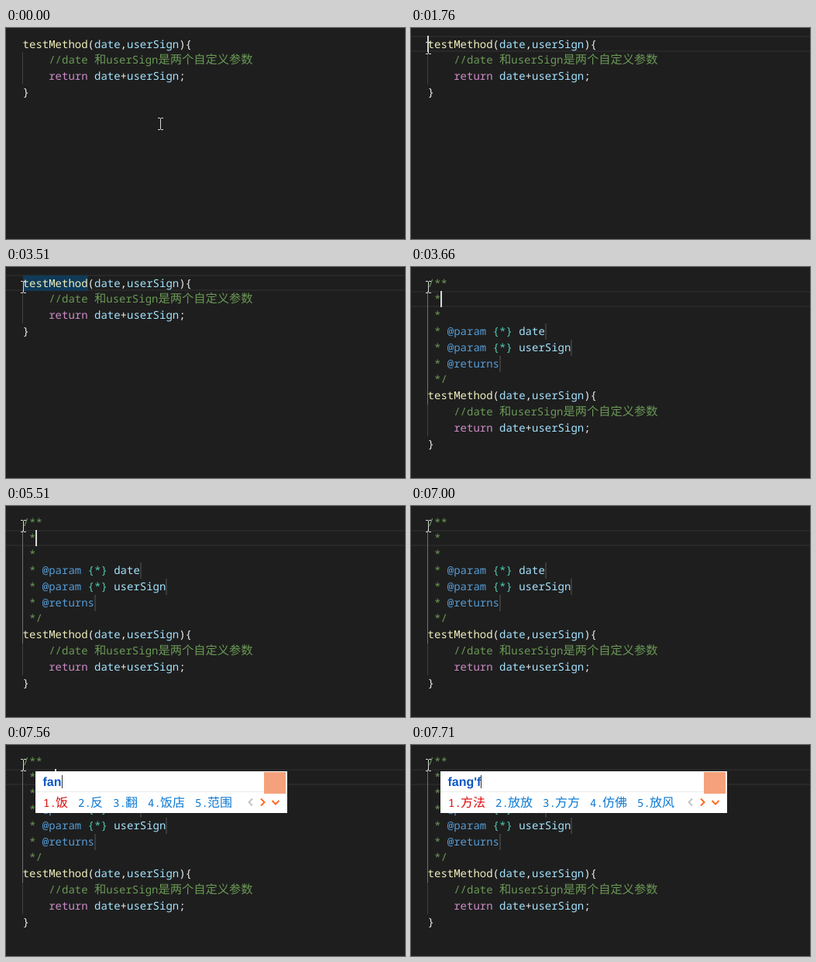
An HTML page with a canvas for the animation above (7.99 s loop, 515x273 px).

```html
<!DOCTYPE html>
<html lang="zh">
<head>
<meta charset="utf-8">
<title>Doc comment snippet</title>
<style>
html, body { margin: 0; width: 515px; height: 273px; overflow: hidden; background: #1e1e1e; }
canvas { display: block; }
</style>
</head>
<body>
<canvas id="stage" width="515" height="273"></canvas>
<script>
const ctx = document.getElementById('stage').getContext('2d');
ctx.textRendering = 'geometricPrecision';

const LOOP = 7990, LEFT = 21.6, CHAR = 8.4, ROW = 20.9;
const MONO = '500 14px "Noto Sans Mono", monospace';
const cjk = size => `${size}px "Noto Sans CJK SC", "Noto Sans CJK", sans-serif`;
const C = {
  fn: '#f0efbc', plain: '#ececec', param: '#a4e4ff', comment: '#6a9955',
  key: '#cd8cc8', tag: '#569cd6', type: '#4ec9b0', link: '#4e94ce'
};

// Each line is a list of [colour, text] runs.
const method = [
  [['fn', 'testMethod'], ['plain', '('], ['param', 'date'], ['plain', ','], ['param', 'userSign'], ['plain', '){']],
  [['comment', '    //date 和userSign是两个自定义参数']],
  [['key', '    return '], ['param', 'date'], ['plain', '+'], ['param', 'userSign'], ['plain', ';']],
  [['plain', '}']]
];
const star = (...runs) => [['comment', ' * '], ...runs];
const paramDoc = name => star(['tag', '@param '], ['type', '{*} '], ['param', name]);
const doc = [
  [['comment', '/**']], star(), star(), paramDoc('date'), paramDoc('userSign'),
  star(['tag', '@returns']), [['comment', ' */']]
];

// Mouse positions: [time, x, y]
const mouse = [
  [0, 199.5, 124], [440, 174, 103], [580, 69.5, 42], [730, 34, 20], [850, 27.5, 12],
  [1000, 24, 18], [1120, 19, 24], [1240, 19, 28], [1360, 21, 28], [1490, 22, 26]
];
const caretToggles = [1760, 2150, 2710, 3240, 3660, 4060, 4490, 5050, 5510, 6070, 6540, 7000];

// Input method states: [time, pinyin, candidates, right edge, editor caret column]
const input = [
  [7280, 'f', '发 放 分 非 ′', 328, 3],
  [7410, 'fa', '发 法 罚 发现 发展', 363, 0],
  [7560, 'fan', '饭 反 翻 饭店 范围', 363, 5],
  [7710, "fang'f", '方法 放放 方方 仿佛 放风', 408, 0]
];

const latest = (list, t) => list.filter(s => s[0] <= t).pop();
const rowTop = i => Math.round(10.4 + ROW * i);
const baseline = i => Math.round(25.5 + 20.8 * i);

function rect(color, x, y, w, h) {
  ctx.fillStyle = color;
  ctx.fillRect(x, y, w, h);
}

function text(s, x, y, color, font) {
  ctx.font = font;
  ctx.fillStyle = color;
  ctx.fillText(s, x, y);
  return x + ctx.measureText(s).width;
}

function stroke(color, width, ...points) {
  ctx.strokeStyle = color;
  ctx.lineWidth = width;
  ctx.beginPath();
  points.forEach(([x, y]) => ctx.lineTo(x, y));
  ctx.stroke();
}

function codeLine(runs, row) {
  let x = LEFT;
  for (const [color, s] of runs)
    for (const part of s.match(/[\u4e00-\u9fff]+|[^\u4e00-\u9fff]+/g))
      x = text(part, x, baseline(row), C[color], part > '\u4e00' ? cjk(15.25) : MONO);
}

function guide(from, to, color) {
  rect(color, 21, rowTop(from), 1, rowTop(to) - rowTop(from));
}

function currentLine(row) {
  rect('#282828', 0, rowTop(row), 515, 21);
  rect('#1e1e1e', 0, rowTop(row) + 2, 515, 17);
}

function caret(x, row) {
  rect('#d8d8d8', x, rowTop(row), 2, 21);
}

function beam(x, y) {
  x = Math.floor(x);
  rect('#d8d8d8', x, y - 7, 1, 14);
  for (const edge of [y - 8, y + 7]) {
    rect('#d8d8d8', x - 3, edge, 3, 1);
    rect('#d8d8d8', x + 1, edge, 3, 1);
  }
}

function hand() {
  const p = new Path2D('M21 38V28q0-2 1.5-2t1.5 2v6q3-1 3 1q3-1 3 1q3-1 3 2v4q0 3-2 5h-8l-6-8q-1-3 2-2z');
  ctx.fillStyle = '#fff';
  ctx.fill(p);
  ctx.strokeStyle = '#000';
  ctx.lineWidth = 1;
  ctx.stroke(p);
}

function chevron(x, y, dx, dy, color) {
  // dx, dy give the pointing direction
  const tip = [x + dx * 2.5, y + dy * 2.5];
  const end = k => [x - dx * 2 + dy * 4.5 * k, y - dy * 2 + dx * 4.5 * k];
  stroke(color, 2, end(-1), tip, end(1));
}

function inputPanel([, pinyin, words, right]) {
  rect('#fff', 38, 34, right - 38, 54);
  rect('#ececec', 38, 60, right - 38, 1);
  const end = text(pinyin, 47.5, 53, '#0b56c4', 'bold 16px "Liberation Sans", sans-serif');
  rect('#333', Math.round(end), 39, 1, 17);
  let x = 48;
  words.split(' ').forEach((word, i) => {
    const color = i ? '#0a78d2' : '#dc0a0a';
    text(`${i + 1}.`, x, 80, color, MONO);
    text(word, x + 16, 80, color, cjk(16));
    x += 29 + 16 * word.length;
  });
  chevron(right - 47, 74, -1, 0, '#c4c4c4');
  chevron(right - 32, 74, 1, 0, '#ff6a22');
  chevron(right - 15, 74, 0, 1, '#ff6a22');
  rect('#f5a27c', right - 30, 35, 28, 28);
}

function draw(t) {
  const documented = t >= 3660;
  const linked = t >= 3240 && t < 3510;
  const ime = latest(input, t);
  rect('#1e1e1e', 0, 0, 515, 273);

  if (t >= 1760) currentLine(documented ? 1 : 0);
  if (t >= 1900 && !documented) rect('#0f3a58', 22, 11, 84, 20);

  const first = documented ? doc.length : 0;
  if (documented) {
    guide(1, 8, '#707070');
    [[18, 3], [22, 4], [11, 5]].forEach(([col, row]) =>
      rect('#3a3a3a', Math.round(LEFT + col * CHAR), rowTop(row), 2, 21));
    doc.forEach(codeLine);
  }
  guide(first + 1, first + 3, '#404040');
  method.forEach((line, i) => codeLine(line, first + i));
  if (linked) {
    text('testMethod', LEFT, baseline(0), C.link, MONO);
    rect(C.link, 22, 28, 84, 1);
  }

  if (caretToggles.filter(s => s <= t).length % 2)
    documented ? caret(38, 1) : caret(21, 0);
  if (ime) {
    if (ime[4]) caret(Math.round(LEFT + ime[4] * CHAR) - 1, 1);
    inputPanel(ime);
  }

  if (linked) hand();
  else beam(...latest(mouse, t).slice(1));
}

const start = performance.now();
function tick() {
  draw((performance.now() - start) % LOOP);
  requestAnimationFrame(tick);
}
tick();
</script>
</body>
</html>
```
